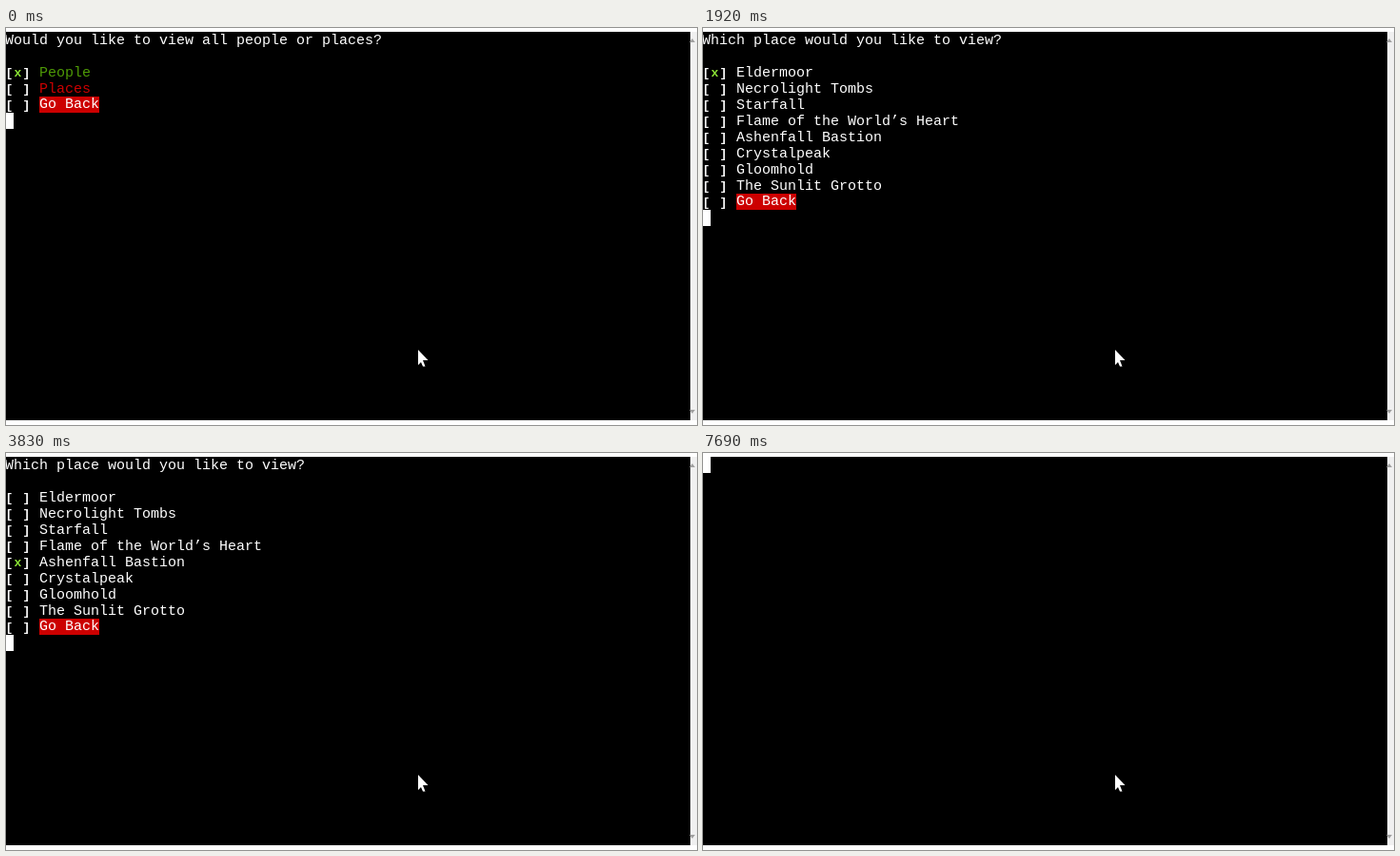
Write an HTML page with a canvas that moves like this. It is 726 px wide and 417 px high and loops after 8000 ms.

```html
<!DOCTYPE html>
<html lang="en">
<head>
<meta charset="utf-8">
<title>Terminal menu</title>
<style>
  html, body { margin: 0; width: 100%; height: 100%; overflow: hidden; background: #fff; }
  canvas { display: block; }
</style>
</head>
<body>
<canvas id="stage" width="726" height="417"></canvas>
<script>
const ctx = document.getElementById('stage').getContext('2d');
const LOOP = 8000;
const CELL = 9, LINE = 17, LEFT = -1, TOP = 4, BASELINE = 13;
const FAMILY = '"Courier New", "Liberation Mono", monospace';
const TEXT_FONT = '15px ' + FAMILY, BOX_FONT = 'bold 13px ' + FAMILY;
const WHITE = '#fff', GREEN = '#4e9a06', LIME = '#8ae234', RED = '#cc0000', GOLD = '#c4900c';

const PLACES = [
  'Eldermoor', 'Necrolight Tombs', 'Starfall', 'Flame of the World’s Heart',
  'Ashenfall Bastion', 'Crystalpeak', 'Gloomhold', 'The Sunlit Grotto'
];
const DETAILS = [
  'Name: The Sunlit Grotto', 'Age: 103',
  'Rumor_1: Missing Adventurers', 'Rumor_2: Powerful Artifact'
];

// Each step: start time, screen, selected option, text row of the block cursor.
const STEPS = [
  [0, kindMenu, 0, 5],
  [1120, kindMenu, 1, 5],
  [1800, blank, 0, 0],
  [1920, placeMenu, 0, 11],
  [3150, placeMenu, 1, 11],
  [3290, placeMenu, 1, 1],
  [3410, placeMenu, 2, 11],
  [3570, placeMenu, 3, 11],
  [3710, placeMenu, 3, 5],
  [3830, placeMenu, 4, 11],
  [3950, placeMenu, 5, 11],
  [4070, placeMenu, 6, 11],
  [4350, placeMenu, 7, 11],
  [5000, details, 0, 11],
  [7690, blank, 0, 0]
];

const rowTop = row => TOP + row * LINE;

function rect(x, y, w, h, color) {
  ctx.fillStyle = color;
  ctx.fillRect(x, y, w, h);
}

function polygon(color, ...points) {
  ctx.fillStyle = color;
  ctx.beginPath();
  points.forEach(([x, y]) => ctx.lineTo(x, y));
  ctx.fill();
}

function print(text, col, row, color = WHITE, baseline = BASELINE) {
  ctx.font = TEXT_FONT;
  ctx.textAlign = 'left';
  ctx.fillStyle = color;
  ctx.fillText(text, LEFT + col * CELL, rowTop(row) + baseline);
}

function boxMark(mark, col, row, color = WHITE) {
  ctx.font = BOX_FONT;
  ctx.textAlign = 'center';
  ctx.fillStyle = color;
  ctx.fillText(mark, LEFT + (col + 0.5) * CELL, rowTop(row) + BASELINE);
}

function checkbox(row, checked) {
  boxMark('[', 0, row);
  if (checked) boxMark('x', 1, row, LIME);
  boxMark(']', 2, row);
}

function option(label, row, checked, color) {
  checkbox(row, checked);
  print(label, 4, row, color);
}

function goBack(row, checked) {
  checkbox(row, checked);
  rect(LEFT + 4 * CELL, rowTop(row), 7 * CELL, LINE, RED);
  print('Go Back', 4, row, WHITE, BASELINE - 1);
}

function blank() {}

function kindMenu(selected) {
  print('Would you like to view all people or places?', 0, 0);
  option('People', 2, selected === 0, GREEN);
  option('Places', 3, selected === 1, RED);
  goBack(4, false);
}

function placeMenu(selected) {
  print('Which place would you like to view?', 0, 0);
  PLACES.forEach((name, i) => option(name, i + 2, i === selected));
  goBack(10, false);
}

function details() {
  print('Details:', 0, 1, GOLD);
  print('Location_type:', 0, 3);
  print('Point of Interest', 15, 3, GREEN);
  DETAILS.forEach((text, i) => print(text, 0, i + 4));
  goBack(10, true);
}

function drawWindow() {
  rect(0, 0, 726, 417, WHITE);
  rect(0, TOP, 719, 408, '#000');
  rect(719, TOP, 7, 408, '#f0f0f0');
  polygon('#a0a0a0', [721, 11], [724, 15], [718, 15]);
  polygon('#a0a0a0', [718, 401], [724, 401], [721, 405]);
}

function drawPointer() {
  polygon(WHITE, [433, 338], [433, 354], [436, 351], [438, 355.5],
    [440.5, 355.5], [438, 349], [443.5, 349]);
}

function drawCursor(screen, row) {
  rect(0, rowTop(row), 8, LINE, WHITE);
  if (screen === placeMenu && row > 1 && row < 11) boxMark('[', 0, row, '#000');
}

function frame(now) {
  const time = now % LOOP;
  const [, screen, selected, cursorRow] = STEPS.findLast(step => step[0] <= time);
  drawWindow();
  screen(selected);
  drawCursor(screen, cursorRow);
  drawPointer();
  requestAnimationFrame(() => frame(performance.now() - start));
}

const start = performance.now();
frame(0);
</script>
</body>
</html>
```
